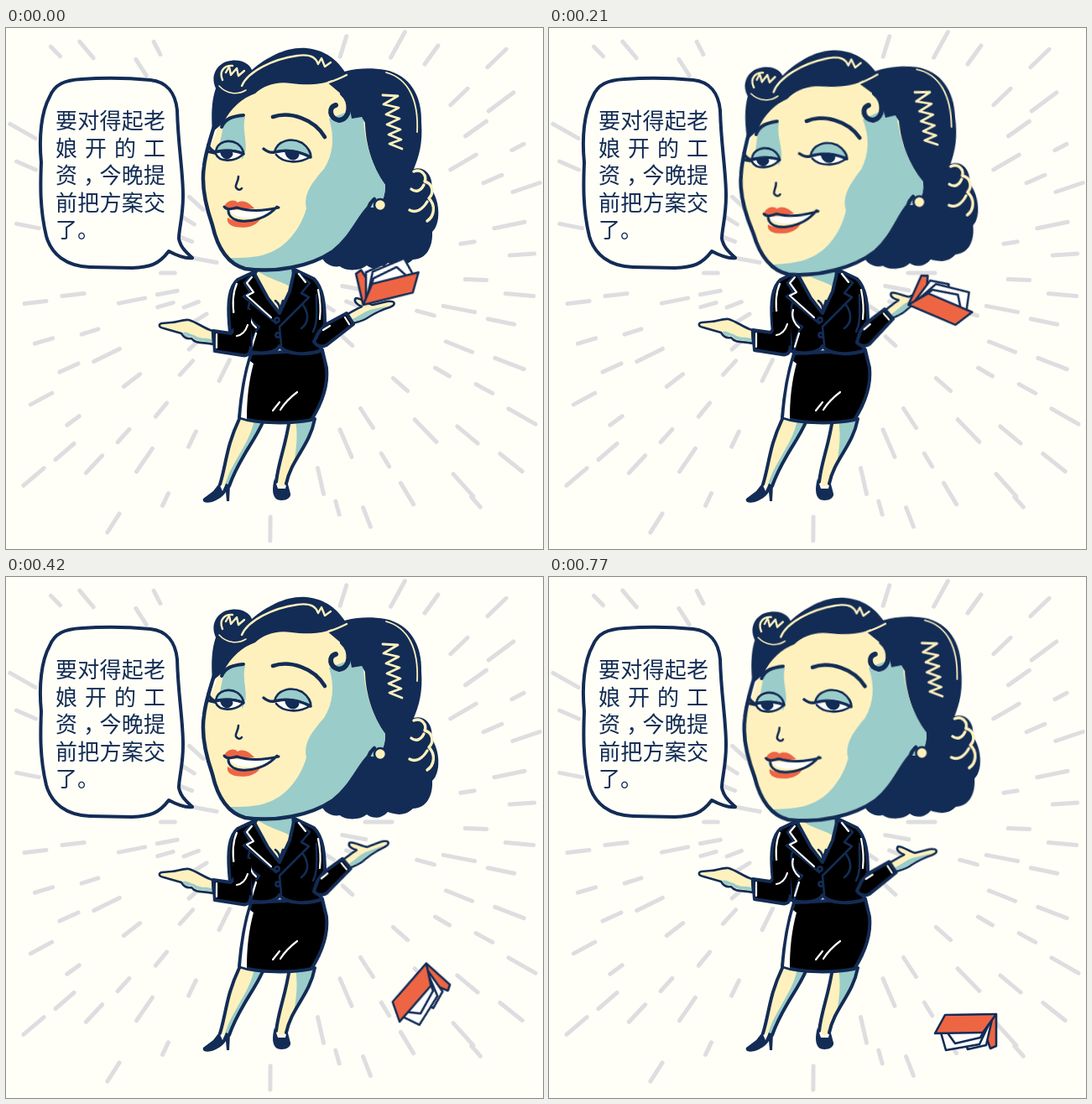
These frames come from a looping animation (640x621 px, 0.84 s). An HTML page:

```html
<!DOCTYPE html>
<html lang="zh-CN">
<head>
<meta charset="utf-8">
<title>Boss lady</title>
<style>
html, body { margin: 0; width: 100%; height: 100%; overflow: hidden; background: #fffff8; }
#stage { position: relative; width: 640px; height: 621px; overflow: hidden; }
svg { display: block; }
p {
  position: absolute; left: 59px; top: 93px; width: 131px; margin: 0;
  font: 26px/32.6px "Noto Sans CJK SC", "Noto Sans CJK", sans-serif;
  color: #132c55; text-align: justify;
}
p span { display: block; white-space: nowrap; text-align-last: justify; }
p span:last-child { text-align-last: left; }
p i { position: relative; left: 7px; font-style: normal; }

.ink { stroke: #132c55; stroke-width: 4; stroke-linejoin: round; stroke-linecap: round; fill: none; }
.thin { stroke-width: 2.6; }
.navy { fill: #132c55; }
.skin { fill: #fef1bd; }
.teal { fill: #9accca; }
.red { fill: #ee6544; }
.black { fill: #000; }
.white { fill: #fff; }
.shine { fill: none; stroke: #fef1bd; stroke-width: 2.4; stroke-linecap: round; stroke-linejoin: round; }
.gleam { fill: none; stroke: #fff; stroke-width: 2.2; stroke-linecap: round; stroke-linejoin: round; }
#rays { stroke: #dedee1; stroke-width: 5; stroke-linecap: round; }

#head { transform-origin: 390px 280px; animation: nod 420ms step-end infinite; }
#point { animation: point 840ms step-end infinite; }
#toss { transform-origin: 372px 375px; animation: toss 840ms step-end infinite; }
#book { animation: drop 840ms step-end infinite; }

@keyframes nod {
  0% { transform: rotate(0); }
  16.66% { transform: rotate(-1.3deg); }
  33.33% { transform: rotate(-2.6deg); }
  49.99% { transform: rotate(-3.7deg); }
  66.66% { transform: rotate(-2.6deg); }
  83.33% { transform: rotate(-1.3deg); }
}
@keyframes point {
  0%, 49.99% { transform: none; }
  8.33%, 41.66%, 58.33% { transform: translate(-1px, 0); }
  16.66%, 33.33%, 66.66% { transform: translate(-3px, -1px); }
  24.99%, 74.99%, 100% { transform: translate(-4px, -1px); }
}
@keyframes toss {
  0% { transform: rotate(0); }
  8.33% { transform: rotate(-3deg); }
  16.66% { transform: rotate(-6deg); }
  24.99% { transform: rotate(-9deg); }
  33.33% { transform: rotate(-10.5deg); }
  41.66% { transform: rotate(-9.2deg); }
  49.99% { transform: rotate(-7.6deg); }
  58.33% { transform: rotate(-6deg); }
  66.66% { transform: rotate(-4.8deg); }
  74.99% { transform: rotate(-3.5deg); }
  83.33% { transform: rotate(-2.2deg); }
  91.66% { transform: rotate(-1deg); }
}
@keyframes drop {
  0% { transform: translate(459px, 310px) rotate(-13deg); }
  8.33% { transform: translate(462px, 307px) rotate(-7deg); }
  16.66% { transform: translate(464px, 308px) rotate(0deg); }
  24.99% { transform: translate(467px, 334px) rotate(24deg); }
  33.33% { transform: translate(470px, 373px) rotate(50deg); }
  41.66% { transform: translate(473px, 436px) rotate(83deg); }
  49.99% { transform: translate(485px, 496px) rotate(132deg); }
  58.33%, 100% { transform: translate(496px, 533px) rotate(180deg); }
}
</style>
</head>
<body>
<div id="stage">
<svg width="640" height="621" viewBox="0 0 640 621">
  <rect width="640" height="621" fill="#fffff8"/>
  <g id="rays"></g>

  <path class="ink" style="fill:#fffff8" d="M52 82C58 67 70 62 90 61C120 59 150 60 172 62C192 64 202 78 204 98C205 140 211 170 211 200C211 225 206 240 206 251C208 262 215 267 222 274C214 275 205 272 194 266C182 282 172 285 150 286L100 285C72 284 54 270 48 248C40 215 41 185 42 160C39 130 42 100 52 82Z"/>

  <g id="legs">
    <path class="skin" d="M278 466L306 470C295 495 278 512 266 546L255 544C263 518 262 500 278 466Z"/>
    <path class="teal" d="M296 468L306 470C295 495 278 512 266 546L261 545C268 518 288 500 296 468Z"/>
    <path class="ink" d="M278 466C262 500 263 518 255 544M306 470C295 495 278 512 266 546"/>
    <path class="navy" d="M254 543L247 552L235 561C233 566 241 567 248 564C255 561 260 557 262 553L263 564L266 564L267 545L262 543L258 552Z"/>
    <path class="skin" d="M338 466L368 466C362 498 340 514 334 543L322 541C325 515 333 500 338 466Z"/>
    <path class="teal" d="M345 466L368 466C364 484 353 498 344 514C346 498 348 488 345 466Z"/>
    <path class="ink" d="M338 466C333 500 325 515 322 541M368 466C362 498 340 514 334 543"/>
    <path class="navy" d="M320 537C317 548 317 558 323 562C331 565 340 561 339 555L335 540L333 549L324 549Z"/>
    <path class="skin" d="M325 541H332V546H325Z"/>
  </g>

  <g id="body">
    <path class="skin" d="M300 280L296 294L326 342L346 294L342 280Z"/>
    <path class="teal" d="M300 284H342V312C336 303 315 301 299 289Z"/>
    <path class="ink" d="M301 284L296 294M342 284L343 296"/>
    <path class="ink thin" d="M321 325C325 328 327 333 326 338L330 325"/>
    <path class="black ink" d="M292 388C285 410 280 440 278 464C300 472 340 472 364 467C378 445 384 425 382 405L377 384Z"/>
    <path class="white" d="M291 397L295 400C289 422 287 444 287 466L280 464C282 440 285 418 291 397Z"/>
    <path class="gleam" d="M327 455C332 447 339 440 347 434M318 456L326 446"/>
    <path class="black ink" d="M295 291L276 300C266 309 264 326 266 352L268 374L291 386C312 390 323 385 326 379C333 389 357 391 377 384L372 377L380 352C380 330 378 310 367 299L344 288L338 314L326 340L312 322Z"/>
    <path class="ink thin" d="M295 292L284 304L291 315L283 320L322 352M345 290L362 304L352 316L361 321L326 356L328 378M290 328C286 340 293 352 302 356C293 366 294 376 292 386M354 330C362 342 360 352 352 358M370 318C370 338 372 350 366 362"/>
    <path class="gleam" d="M293 297L287 304L295 315L287 319L316 345M275 305C269 318 270 332 272 345M291 336C288 346 294 354 298 357M349 293L357 303M372 312C375 326 375 338 374 347M293 380L298 364"/>
    <circle class="ink thin" cx="323" cy="348" r="2.6"/>
    <circle class="ink thin" cx="324" cy="366" r="2.6"/>
  </g>

  <g id="point">
    <path class="ink thin skin" d="M246 361C236 358 228 351 218 348C210 347 204 351 197 351L186 352C181 353 182 357 188 358L209 364C212 369 216 371 221 370C226 377 236 374 247 377Z"/>
    <path class="teal" d="M210 363C216 361 219 365 224 366C230 371 238 369 245 371V375C236 372 227 375 222 368C217 369 213 368 210 363Z"/>
    <path class="black ink" d="M247 361L268 364L288 340L292 376C292 386 290 392 281 390L249 385Z"/>
    <path class="black" d="M270 340L292 335V380L272 368Z"/>
    <path class="gleam" d="M251 365V381M275 367C282 366 286 360 288 354"/>
  </g>

  <g id="head">
    <path class="navy" d="M383 62C400 48 430 46 452 50C482 56 496 82 495 112C497 137 492 154 486 168C500 164 510 178 507 192C518 208 518 234 508 243C509 262 500 276 485 276C474 287 461 282 455 280C446 290 435 287 430 283C420 291 403 289 398 284C388 286 378 280 376 272L390 110Z"/>
    <path class="skin" d="M262 92L300 60L386 60L428 105C427 135 436 165 452 187C452 206 445 215 432 214C420 226 411 250 390 266C362 285 320 292 285 287C264 281 252 262 246 235C239 215 232 190 236 165Z"/>
    <path class="teal" d="M385 108L412 98L426 108C427 135 436 165 452 187C452 206 445 215 432 214C420 226 411 250 390 266C362 285 320 292 285 287C276 284 270 279 265 274C280 274 298 274 311 269C333 262 351 240 358 215C354 197 366 183 379 168C390 150 392 130 385 108Z"/>
    <path class="teal" d="M260 112C270 105 280 104 285 106C280 124 292 144 281 157C283 141 270 132 255 137Z"/>
    <path class="ink" style="stroke-width:4.5" d="M251 108C246 124 238 146 236 165C232 190 239 215 246 235C252 262 264 281 285 287C320 292 362 285 390 266C411 250 420 226 432 214M432 214C434 208 437 206 439 204"/>
    <path class="navy" d="M246 124C244 100 246 83 250 72C242 55 254 40 268 39C279 37 290 42 293 50C312 34 335 22 358 24C380 26 395 38 405 54L386 63C374 68 356 68 340 66C324 63 307 68 297 78C281 84 269 94 259 113Z"/>
    <path class="navy" d="M382 64L402 60L432 100V120L424 106L412 108L408 86Z"/>
    <path class="ink" style="stroke-width:6" d="M401 78C412 88 411 108 397 110C385 108 384 94 393 92"/>
    <path class="shine" d="M384 65C391 63 398 60 406 56" stroke-width="2"/>
    <path class="shine" d="M281 69C288 52 318 37 347 33C360 31 369 33 372 43L376 36L380 46L387 41M258 62C253 50 262 44 270 45M262 53L266 46L268 56L275 48L277 57L284 51"/>
    <path class="shine" d="M254 69C263 79 276 80 286 74" style="stroke-width:1.5"/>
    <path class="shine" style="stroke-width:2.8" d="M449 80L467 81L450 91L468 95L453 103L469 108L454 115L470 121L456 127L471 133L457 138L472 144"/>
    <path class="shine" d="M453 53C479 60 492 85 490 124" style="stroke-width:1.8"/>
    <path class="shine" style="stroke-width:3.4" d="M486 171C495 167 502 176 499 183C508 185 511 196 504 203C512 211 511 224 502 230M483 192C488 196 494 195 498 187M481 217C488 221 496 217 502 207"/>

    <path class="ink" d="M257 118C261 108 270 105 283 104"/>
    <path class="ink" style="stroke-width:4.6" d="M318 106C338 99 367 108 380 130"/>

    <path class="white" d="M320 148C326 161 349 164 362 154L352 148Z"/>
    <path class="teal ink thin" d="M320 148C323 134 340 130 353 137C360 142 364 149 363 154C350 146 335 145 320 148Z"/>
    <path class="navy" d="M332 146C346 144 351 148 349 153C345 161 333 158 332 146Z"/>
    <path class="ink thin" d="M322 151C330 161 349 162 362 154"/>
    <path class="ink" style="stroke-width:3.5" d="M307 144C312 148 316 149 320 148C334 144 350 147 363 154"/>
    <path class="white" d="M250 149C253 160 272 160 282 150L270 146Z"/>
    <path class="teal ink thin" d="M250 147C252 135 266 132 276 138C281 142 283 147 283 150C272 145 262 145 250 147Z"/>
    <path class="navy" d="M255 147C267 144 272 147 270 152C266 159 256 157 255 147Z"/>
    <path class="ink thin" d="M250 150C254 160 272 160 282 151"/>
    <path class="ink" style="stroke-width:3.4" d="M283 150C272 145 262 145 249 148C245 146 242 143 241 139M249 149L240 147"/>
    <path class="ink thin" d="M277 177C277 183 273 186 274 190C276 193 279 194 281 191"/>

    <path class="red" d="M260 213C263 206 271 203 276 208C284 204 290 209 296 215L266 217Z"/>
    <path class="white" d="M266 216C285 220 305 219 321 216C306 228 272 231 266 216Z"/>
    <path class="red" d="M264 226C275 233 290 232 304 226C298 238 284 239 273 237C266 235 263 232 264 226Z"/>
    <path class="ink" style="stroke-width:3" d="M260 213C263 217 268 216 275 214C290 219 308 218 325 214M265 216C264 227 275 231 287 230C302 229 315 222 323 213"/>
    <circle class="skin ink thin" cx="446" cy="211" r="7"/>
  </g>

  <g id="toss">
    <path class="ink thin skin" d="M407 341C415 337 419 334 424 332C417 329 414 325 417 322C423 322 430 328 437 330L454 326C465 325 465 330 457 333C447 336 441 339 433 344C425 350 419 350 413 352Z"/>
    <path class="teal" d="M411 348C420 344 429 336 438 335L456 331C448 335 440 338 432 343C425 348 419 349 414 350Z"/>
    <path class="black ink" d="M373 362L382 353L406 340L414 353L382 378C376 381 370 379 367 374Z"/>
    <path class="gleam" d="M404 345L409 353M378 360L386 355"/>
  </g>

  <g id="book">
    <path class="ink thin red" d="M-37 -26L-30 -29L-24 -12L-32 10L-37 11Z"/>
    <path class="ink thin white" d="M-33 10L-25 -25L-3 -30L4 -8Z"/>
    <path class="ink thin white" d="M-33 10L-17 -24L23 -31L29 -10Z"/>
    <path class="ink thin white" d="M-33 10L-18 -16L12 -23L22 -9Z"/>
    <path class="ink thin red" d="M-21 -10L36 -11L24 11L-37 12Z"/>
  </g>
</svg>
<p><span>要对得起老</span><span>娘开的工</span><span>资<i>，</i>今晚提</span><span>前把方案交</span><span>了。</span></p>
</div>
<script>
const cx = 318, cy = 292;
const rays = document.getElementById('rays');
let seed = 11;
const rand = () => (seed = seed * 16807 % 2147483647) / 2147483647;

// Each dash lies on a line through the centre.
function dash(x, y, len) {
  const a = Math.atan2(y - cy, x - cx);
  const dx = Math.cos(a) * len / 2, dy = Math.sin(a) * len / 2;
  const line = document.createElementNS('http://www.w3.org/2000/svg', 'line');
  Object.entries({ x1: x - dx, y1: y - dy, x2: x + dx, y2: y + dy })
    .forEach(([k, v]) => line.setAttribute(k, v.toFixed(1)));
  rays.append(line);
}

const spots = [
  59,28, 96,26, 161,47, 180,24, 20,123, 24,164, 26,236, 35,327, 80,318, 45,373,
  100,362, 150,325, 190,330, 75,405, 42,442, 120,390, 150,420, 80,468, 140,486,
  33,535, 70,505, 105,520, 128,590, 185,455, 215,405, 165,515, 190,562, 222,490,
  315,597, 375,540, 395,572, 430,583, 405,495, 430,465, 452,515, 478,555, 500,480,
  470,425, 545,545, 560,565, 550,485, 602,518, 615,463, 570,430, 520,410, 540,380,
  600,400, 590,350, 540,335, 612,318, 560,300, 500,340, 615,270, 550,256, 600,235,
  620,190, 580,180, 545,160, 610,142, 560,120, 590,88, 540,82, 585,36, 507,32,
  467,20, 402,22
];
for (let i = 0; i < spots.length; i += 2)
  dash(spots[i], spots[i + 1], 16 + rand() * 22);

for (let i = 0; i < 34; i++) {
  const a = i / 34 * Math.PI * 2, r = 75 + rand() * 55;
  dash(cx + Math.cos(a) * r, cy + Math.sin(a) * r, 14 + rand() * 18);
}
</script>
</body>
</html>
```
